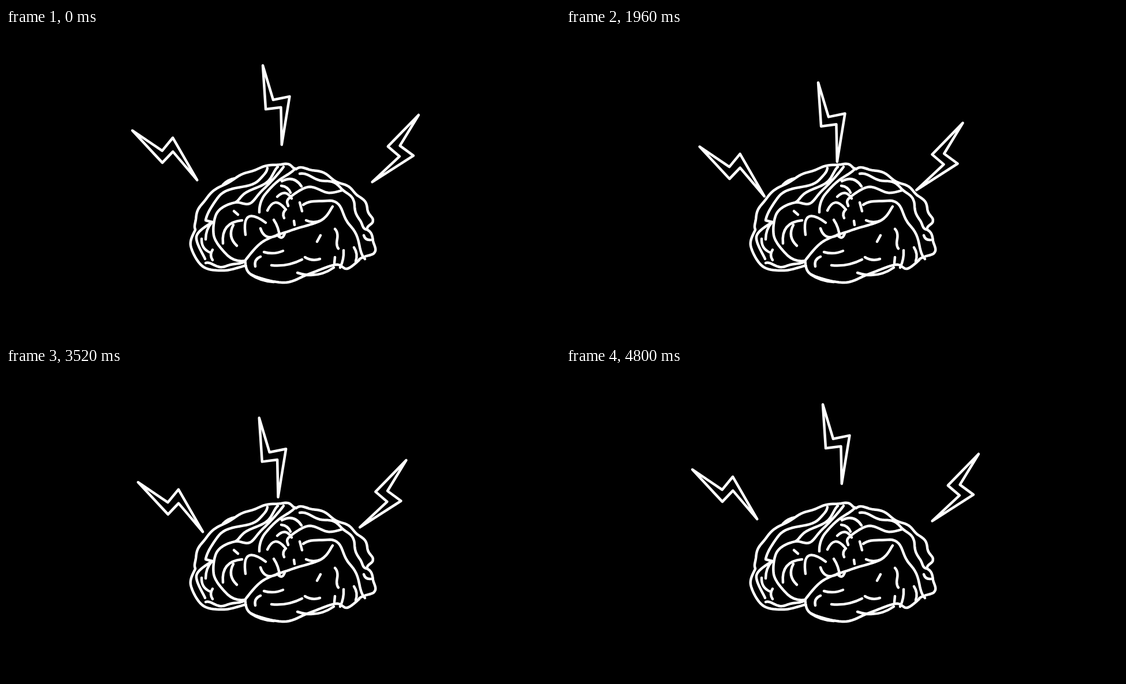
An HTML page with a canvas that plays this animation: 960x540 px, repeating every 4840 ms.

```html
<!DOCTYPE html>
<html lang="en">
<head>
<meta charset="utf-8">
<title>Brain and lightning</title>
<style>
  html, body { margin: 0; width: 100%; height: 100%; overflow: hidden; background: #000; }
  canvas { display: block; width: 960px; height: 540px; }
</style>
</head>
<body>
<canvas id="stage" width="960" height="540"></canvas>
<script>
const ctx = document.getElementById('stage').getContext('2d');
const LOOP = 4840, STEP = 40, HALF_BEAT = 400;
const TRAVEL = 35, SLANT = 28.5 * Math.PI / 180;
const brain = new Path2D();

// Smooth curve through a few key points, rippled sideways by a sine wave.
function fold(keys, ripple = 0, waves = 0) {
  const points = keys.split(' ').map(pair => pair.split(',').map(Number));
  const spans = points.length - 1, detail = 12;
  const at = i => points[Math.max(0, Math.min(spans, i))];
  for (let k = 0; k <= spans * detail; k++) {
    const i = Math.min(spans - 1, Math.floor(k / detail)), t = k / detail - i;
    const [a, b, c, d] = [at(i - 1), at(i), at(i + 1), at(i + 2)];
    const [x, y] = [0, 1].map(n => b[n] + t / 2 * (c[n] - a[n]
      + t * (2 * a[n] - 5 * b[n] + 4 * c[n] - d[n] + t * (3 * (b[n] - c[n]) + d[n] - a[n]))));
    const length = Math.hypot(c[0] - b[0], c[1] - b[1]);
    const shift = ripple * Math.sin(2 * Math.PI * waves * k / (spans * detail)) / length;
    const px = x + (c[1] - b[1]) * shift, py = y - (c[0] - b[0]) * shift;
    if (k) brain.lineTo(px, py); else brain.moveTo(px, py);
  }
}

// Single bow; a positive bend bulges to the left of its direction.
function mark(x0, y0, x1, y1, bend = 0) {
  const dx = x1 - x0, dy = y1 - y0, pull = 2 * bend / Math.hypot(dx, dy);
  brain.moveTo(x0, y0);
  brain.quadraticCurveTo((x0 + x1) / 2 + dy * pull, (y0 + y1) / 2 - dx * pull, x1, y1);
}

// Outline
fold('328,350 330,324 352,290 397,261 440,243 482,236 503,245', 1, 6);
fold('503,245 526,244 558,257 588,274 612,291 627,314 634,335 626,350', 2, 5);
fold('627,351 637,368 637,390 612,402', 1.5, 2);
fold('328,350 320,378 341,414 378,421 413,413');
fold('414,404 425,428 482,442 525,427 571,411 591,418 612,403');

// Long folds
fold('414,404 445,371 495,351 546,334 566,310');
fold('453,243 435,267 372,289 346,333', 1, 3);
fold('471,241 453,266 414,288 397,303', -1, 2);
fold('481,241 446,280 424,304 397,303 365,322 360,360 384,395', 1, 3);
fold('501,244 475,264 447,290 439,320', 1, 2);
fold('489,309 490,296 524,276 558,286 582,282');
fold('509,253 545,263 580,276 602,302 612,335 626,350', 2, 4);
fold('515,307 565,300 598,345 622,401', 2, 3);

// Frontal lobe
fold('357,337 330,362 345,401');
fold('346,408 380,414 415,404', 1.5, 2);
mark(384, 395, 415, 404, -4);
mark(376, 272, 397, 261, 2);
mark(346, 334, 357, 337);
mark(357, 337, 346, 367, -3);
mark(339, 366, 354, 390, -5);
mark(358, 385, 358, 403, -3);
mark(376, 374, 409, 334, 13);
mark(394, 342, 400, 378, -7);
mark(395, 318, 402, 324);

// Centre
mark(415, 359, 450, 338, 24);
mark(441, 348, 468, 361, -8);
mark(464, 333, 474, 362, 2);
mark(470, 359, 483, 357, -6);
mark(453, 317, 483, 313, 12);
mark(485, 315, 482, 330, -3);
mark(499, 335, 500, 342);
mark(509, 303, 513, 318);
mark(520, 334, 546, 334, -3);
mark(470, 293, 495, 296, 8);
mark(478, 266, 512, 275, 8);
mark(477, 274, 493, 286, 3);

// Temporal lobe and back
mark(424, 428, 464, 441, -3);
mark(505, 425, 568, 416, -8);
mark(432, 414, 441, 397, 4);
mark(447, 389, 480, 387, -3);
mark(460, 412, 513, 402, -4);
mark(518, 398, 544, 401, -3);
mark(539, 371, 545, 360);
fold('570,349 574,366 576,383', 2, 1);
mark(570, 398, 569, 408);
mark(585, 386, 579, 416, 2);
mark(603, 381, 606, 405, 3);
mark(620, 360, 632, 368, -3);

// One bolt, pointing along +x from its tail; every copy is a rotation of it.
const boltShape = new Path2D('M0 0L62.3-3.6L63.2-32.7L141.5 0L78-13.7L75.2 12.7Z');
const bolts = [
  { x: 219, y: 178, angle: 37.5 },
  { x: 445, y: 65, angle: 76.6 },
  { x: 715, y: 151, angle: 124.6 }
];

// Cubic easing with handles (0.63, 0) and (0.88, 1), solved by bisection.
function ease(x) {
  const bezier = (s, a, b) => 3 * (1 - s) ** 2 * s * a + 3 * (1 - s) * s * s * b + s ** 3;
  let low = 0, high = 1;
  for (let i = 0; i < 24; i++) {
    const mid = (low + high) / 2;
    if (bezier(mid, 0.63, 0.88) < x) low = mid; else high = mid;
  }
  return bezier(low, 0, 1);
}

function draw(time) {
  const t = Math.floor((time % LOOP) / STEP) * STEP;
  const phase = t % (2 * HALF_BEAT);
  const reach = TRAVEL * ease(1 - Math.abs(phase - HALF_BEAT) / HALF_BEAT);

  ctx.fillStyle = '#000';
  ctx.fillRect(0, 0, 960, 540);
  ctx.strokeStyle = '#fff';
  ctx.lineCap = ctx.lineJoin = 'round';
  ctx.lineWidth = 4.5;
  ctx.stroke(brain);

  for (const { x, y, angle } of bolts) {
    ctx.save();
    ctx.translate(x, y);
    ctx.rotate(angle * Math.PI / 180);
    ctx.translate(reach * Math.cos(SLANT), reach * Math.sin(SLANT));
    ctx.stroke(boltShape);
    ctx.restore();
  }
}

const start = performance.now();
function tick() {
  draw(performance.now() - start);
  requestAnimationFrame(tick);
}
tick();
</script>
</body>
</html>
```
